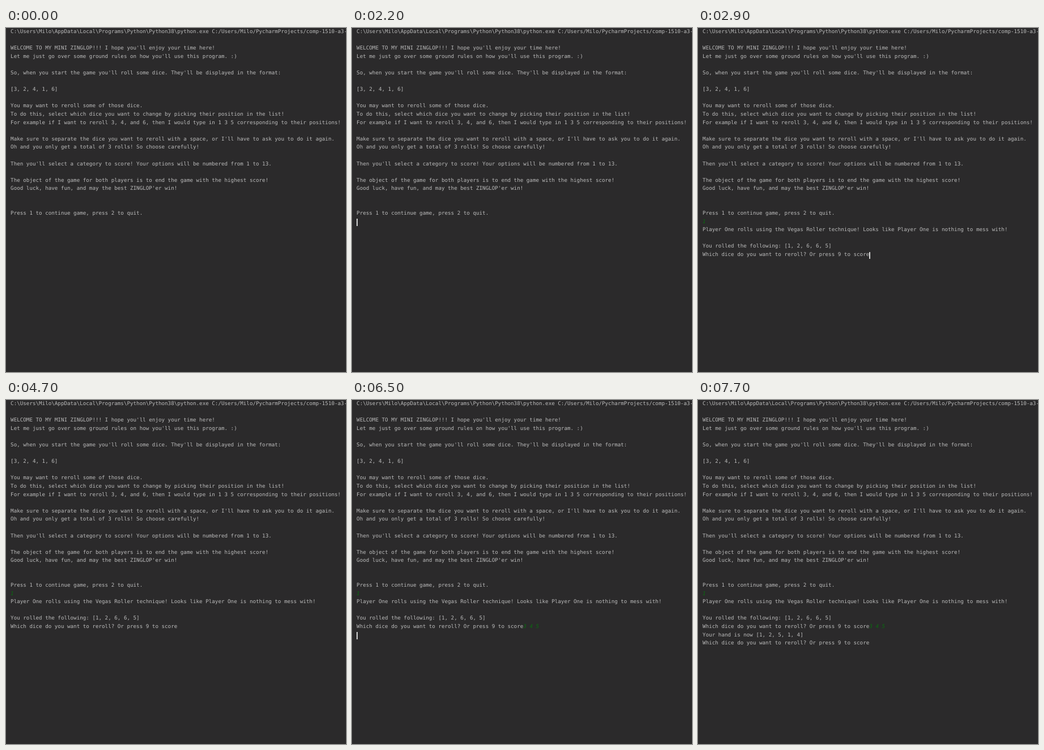
Write an HTML page that moves like this. It is 600 px wide and 608 px high and loops after 8000 ms.

```html
<!DOCTYPE html>
<html lang="en">
<head>
<meta charset="utf-8">
<style>
html, body { margin: 0; width: 100%; height: 100%; overflow: hidden; background: #2b2a2b; }
pre {
  margin: 0; position: absolute; left: 8.1px; top: 0;
  color: #bbb; font: 9.23px/14.59px "DejaVu Sans Mono", monospace;
  text-rendering: geometricPrecision; font-variant-ligatures: none;
}
i { color: #086e0e; }
#caret { position: absolute; width: 1.5px; height: 12.4px; margin-top: 1.6px; background: #d4d4d4; }
</style>
</head>
<body>
<pre id="console"></pre>
<script>
const LOOP = 8000;
const intro = String.raw`C:\Users\Milo\AppData\Local\Programs\Python\Python38\python.exe C:/Users/Milo/PycharmProjects/comp-1510-a3-

WELCOME TO MY MINI ZINGLOP!!! I hope you'll enjoy your time here!
Let me just go over some ground rules on how you'll use this program. :)

So, when you start the game you'll roll some dice. They'll be displayed in the format:

[3, 2, 4, 1, 6]

You may want to reroll some of those dice.
To do this, select which dice you want to change by picking their position in the list!
For example if I want to reroll 3, 4, and 6, then I would type in 1 3 5 corresponding to their positions!

Make sure to separate the dice you want to reroll with a space, or I'll have to ask you to do it again.
Oh and you only get a total of 3 rolls! So choose carefully!

Then you'll select a category to score! Your options will be numbered from 1 to 13.

The object of the game for both players is to end the game with the highest score!
Good luck, have fun, and may the best ZINGLOP'er win!


Press 1 to continue game, press 2 to quit.
`;
const question = "Which dice do you want to reroll? Or press 9 to score";
const firstRoll = `Player One rolls using the Vegas Roller technique! Looks like Player One is nothing to mess with!

You rolled the following: [1, 2, 6, 6, 5]
${question}`;
const secondRoll = `Your hand is now [1, 2, 5, 1, 4]\n${question}`;

// [time, printed text, typed by the user]
const log = [
  [0, intro], [2400, "1", true], [2700, "\n"], [2900, firstRoll],
  [5800, "3", true], [6100, " ", true], [6200, "4", true], [6300, " ", true], [6400, "5", true],
  [6500, "\n"], [6700, secondRoll]
];
// Times at which the caret toggles, hidden at first
const blinks = [300, 700, 1200, 1700, 2200, 3700, 4200, 4700, 5200, 5700, 5800, 7700];

const view = document.getElementById("console");
let shown = "";

function render(t) {
  const text = log.filter(([at]) => at <= t)
    .map(([, s, typed]) => typed ? `<i>${s}</i>` : s).join("");
  const caretOn = blinks.filter(at => at <= t).length % 2;
  const html = text + (caretOn ? '<span id="caret"></span>' : "");
  if (html !== shown) view.innerHTML = shown = html;
}

const start = performance.now();
function tick() {
  render((performance.now() - start) % LOOP);
  requestAnimationFrame(tick);
}
tick();
</script>
</body>
</html>
```
